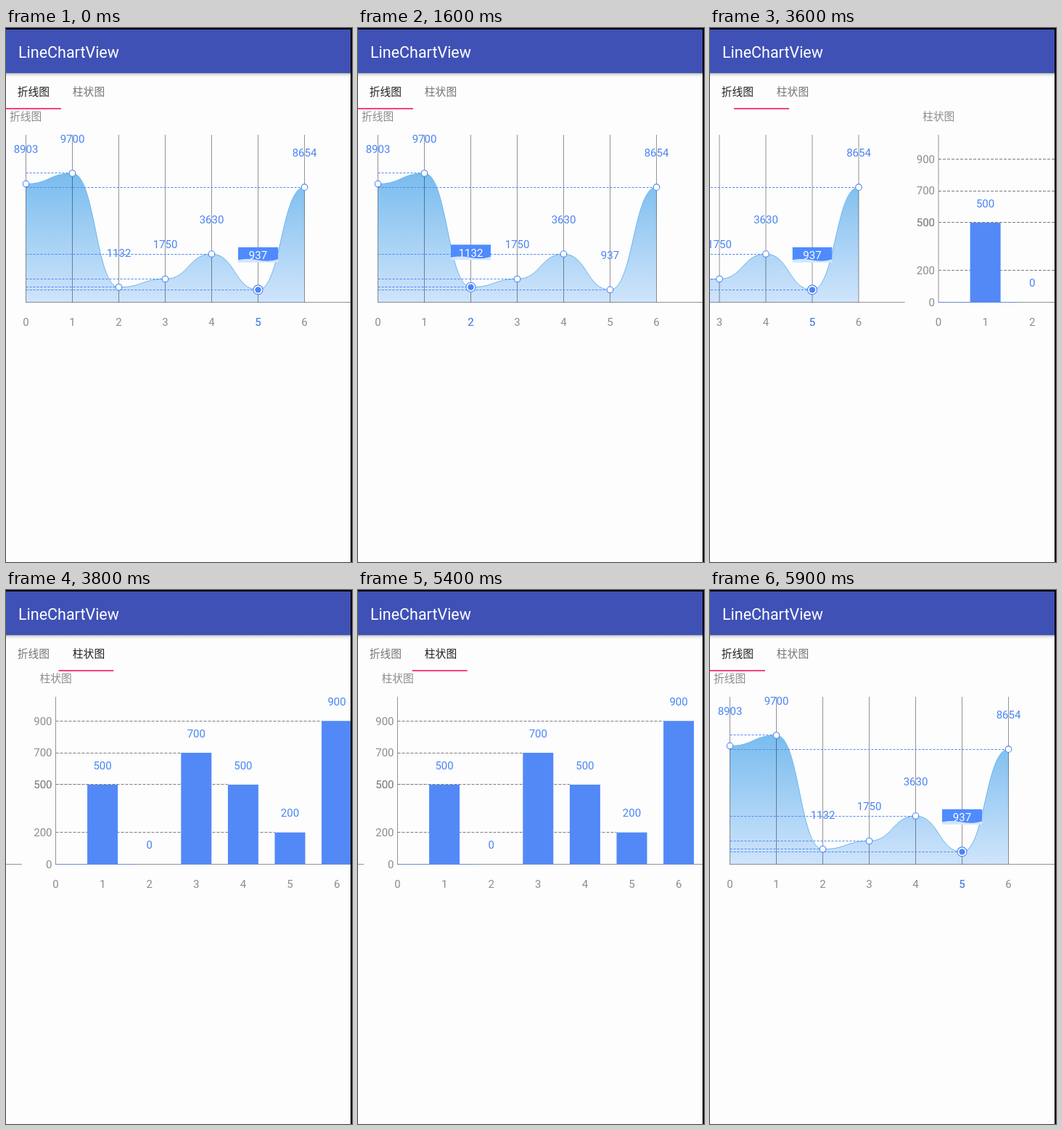
An HTML page that plays this animation: 477x735 px, repeating every 7.4 s.

```html
<!DOCTYPE html>
<html lang="zh">
<head>
<meta charset="utf-8">
<title>LineChartView</title>
<style>
@property --scroll { syntax: "<number>"; inherits: true; initial-value: 0; }
html, body { margin: 0; width: 100%; height: 100%; overflow: hidden; background: #fdfdfd; }
svg { display: block; width: 477px; height: 735px; animation: scroll 7.4s step-end infinite; }
text { font: 15px Roboto, sans-serif; fill: #8c8c8c; text-anchor: middle; }
.cjk { font: 14.8px "Noto Sans CJK SC", "Noto Sans CJK", sans-serif; text-anchor: start; }
.title { font-size: 21.5px; fill: #fff; text-anchor: start; }
.value, .on { fill: #4a84f7; }
.tip { fill: #fff; }
.end { text-anchor: end; }
.grid { stroke: rgba(0, 0, 0, .42); fill: none; }
.dash { stroke: #4f87f7; stroke-dasharray: 3 2; }
.level { stroke: #7d7d7d; stroke-dasharray: 4 2; }
.dot { fill: #fff; stroke: #4a84f7; stroke-width: 1.1; }
.pages { transform: translateX(calc(var(--scroll) * -1px)); }
.bar { transform: translateX(calc(var(--scroll) * .16px)); }
.tab1 { fill: #212121; animation: tab1 7.4s step-end infinite; }
.tab2 { fill: #757575; animation: tab2 7.4s step-end infinite; }
.pick { opacity: 0; animation: 7.4s step-end infinite; }
.p1 { animation-name: pick1; }
.p2 { animation-name: pick2; }
.p3 { animation-name: pick3; }
.p4 { animation-name: pick4; }
.p5 { animation-name: pick5; }

@keyframes scroll {
  0% { --scroll: 0; }
  48.648% { --scroll: 206.5; }
  50% { --scroll: 365; }
  51.351% { --scroll: 453; }
  52.702% { --scroll: 472; }
  54.054% { --scroll: 475; }
  72.972% { --scroll: 467; }
  74.324% { --scroll: 323; }
  75.675% { --scroll: 88; }
  77.027% { --scroll: 18; }
  78.378% { --scroll: 3; }
  79.729%, 100% { --scroll: 0; }
}
@keyframes tab1 {
  0%, 75.675%, 100% { fill: #212121; }
  50% { fill: #757575; }
}
@keyframes tab2 {
  0%, 75.675%, 100% { fill: #757575; }
  50% { fill: #212121; }
}
@keyframes pick5 { 0%, 36.486%, 100% { opacity: 1; } 12.162% { opacity: 0; } }
@keyframes pick3 { 0%, 16.216%, 100% { opacity: 0; } 12.162% { opacity: 1; } }
@keyframes pick4 { 0%, 21.621%, 100% { opacity: 0; } 16.216% { opacity: 1; } }
@keyframes pick2 { 0%, 31.081%, 100% { opacity: 0; } 21.621% { opacity: 1; } }
@keyframes pick1 { 0%, 36.486%, 100% { opacity: 0; } 31.081% { opacity: 1; } }
</style>
</head>
<body>
<svg viewBox="0 0 477 735">
  <defs>
    <linearGradient id="area" gradientUnits="userSpaceOnUse" x1="0" y1="200" x2="0" y2="377">
      <stop offset="0" stop-color="#79bcee"/>
      <stop offset="1" stop-color="#cfe4fb"/>
    </linearGradient>
    <linearGradient id="shade" x1="0" y1="0" x2="0" y2="1">
      <stop offset="0" stop-color="#000" stop-opacity=".32"/>
      <stop offset=".35" stop-color="#000" stop-opacity=".1"/>
      <stop offset="1" stop-color="#000" stop-opacity="0"/>
    </linearGradient>
  </defs>
  <g class="pages">
    <g id="line"></g>
    <g id="bars" transform="translate(475)"></g>
  </g>
  <rect y="2" width="475" height="60" fill="#3f51b5"/>
  <rect y="62" width="475" height="6" fill="url(#shade)"/>
  <text class="title" x="17" y="40.5">LineChartView</text>
  <text class="cjk tab1" x="15.7" y="92.8">折线图</text>
  <text class="cjk tab2" x="91.8" y="92.8">柱状图</text>
  <rect class="bar" y="110" width="76" height="2" fill="#f8427f"/>
  <path d="M0 0H477V735H475V2H0Z" fill="#000"/>
</svg>
<script>
const BASE = 377.5;
const label = (x, y, s, cls = "") => `<text class="${cls}" x="${x}" y="${y + 5.3}">${s}</text>`;
const line = (x1, y1, x2, y2, cls) => `<path class="${cls}" d="M${x1} ${y1}L${x2} ${y2}"/>`;
const dot = (x, y, r) => `<circle class="dot" cx="${x}" cy="${y}" r="${r}"/>`;

function lineChart(values) {
  const pts = values.map((v, i) => ({ v, i, x: 27.5 + 64 * i, y: BASE - v * .0183 }));
  const last = pts[pts.length - 1];
  const curve = pts.slice(1).reduce((d, p) => {
    const mid = p.x - 32, prev = pts[p.i - 1];
    return `${d}C${mid} ${prev.y} ${mid} ${p.y} ${p.x} ${p.y}`;
  }, `M${pts[0].x} ${pts[0].y}`);

  const picked = ({ v, i, x, y }) => `<g class="pick p${i}">
    <g transform="translate(${x - 27.5} ${y - 58.5})">
      <path fill="#d3e6ff" d="M0 15H55V21H0Z"/>
      <path fill="#4f8bff" d="M0 0H55V16.5C46 20 34 19 26 17.5S10 15.5 0 17.5Z"/>
    </g>
    ${label(x, y - 47.5, v, "tip")}${label(x, 404.5, i, "on")}
    ${dot(x, y, 6.5)}<circle class="on" cx="${x}" cy="${y}" r="4.2"/></g>`;

  return `<text class="cjk" x="5" y="126.6">折线图</text>
    <path d="${curve}V${BASE}H27.5Z" fill="url(#area)"/>
    <path d="${curve}" fill="none" stroke="#6db6ec"/>`
    + pts.map(p => line(p.x, 147, p.x, BASE, "grid")).join("")
    + line(27, BASE, 475, BASE, "grid")
    + pts.map(p => line(27.5, Math.floor(p.y) + .5, p.x, Math.floor(p.y) + .5, "dash")).join("")
    + pts.map(p => dot(p.x, p.y, 4.3) + label(p.x, p.y - 47.5, p.v, "value") + label(p.x, 404.5, p.i)).join("")
    + pts.slice(1, -1).map(picked).join("");
}

function barChart(values) {
  const pts = values.map((v, i) => ({ v, i: i + 1, x: 46.5 + 64.6 * (i + 1), y: BASE - v * .2192 }));
  const level = ({ v, x, y }) => {
    const row = Math.floor(y) + .5;
    return line(46.5, row, x - 21, row, v ? "level" : "dash") + label(41.5, y, v, "end");
  };
  const bar = ({ v, i, x, y }) =>
    `<rect x="${x - 21}" y="${y}" width="42" height="${BASE - y}" fill="#5289f7"/>`
    + label(x, y - 26.5, v, "value") + label(x, 404.5, i);

  return `<text class="cjk" x="24.5" y="126.6">柱状图</text>`
    + line(46.5, 147, 46.5, BASE, "grid") + line(46, BASE, 475, BASE, "grid")
    + label(46.5, 404.5, 0)
    + pts.map(level).join("") + pts.map(bar).join("");
}

document.getElementById("line").innerHTML = lineChart([8903, 9700, 1132, 1750, 3630, 937, 8654]);
document.getElementById("bars").innerHTML = barChart([500, 0, 700, 500, 200, 900]);
</script>
</body>
</html>
```
